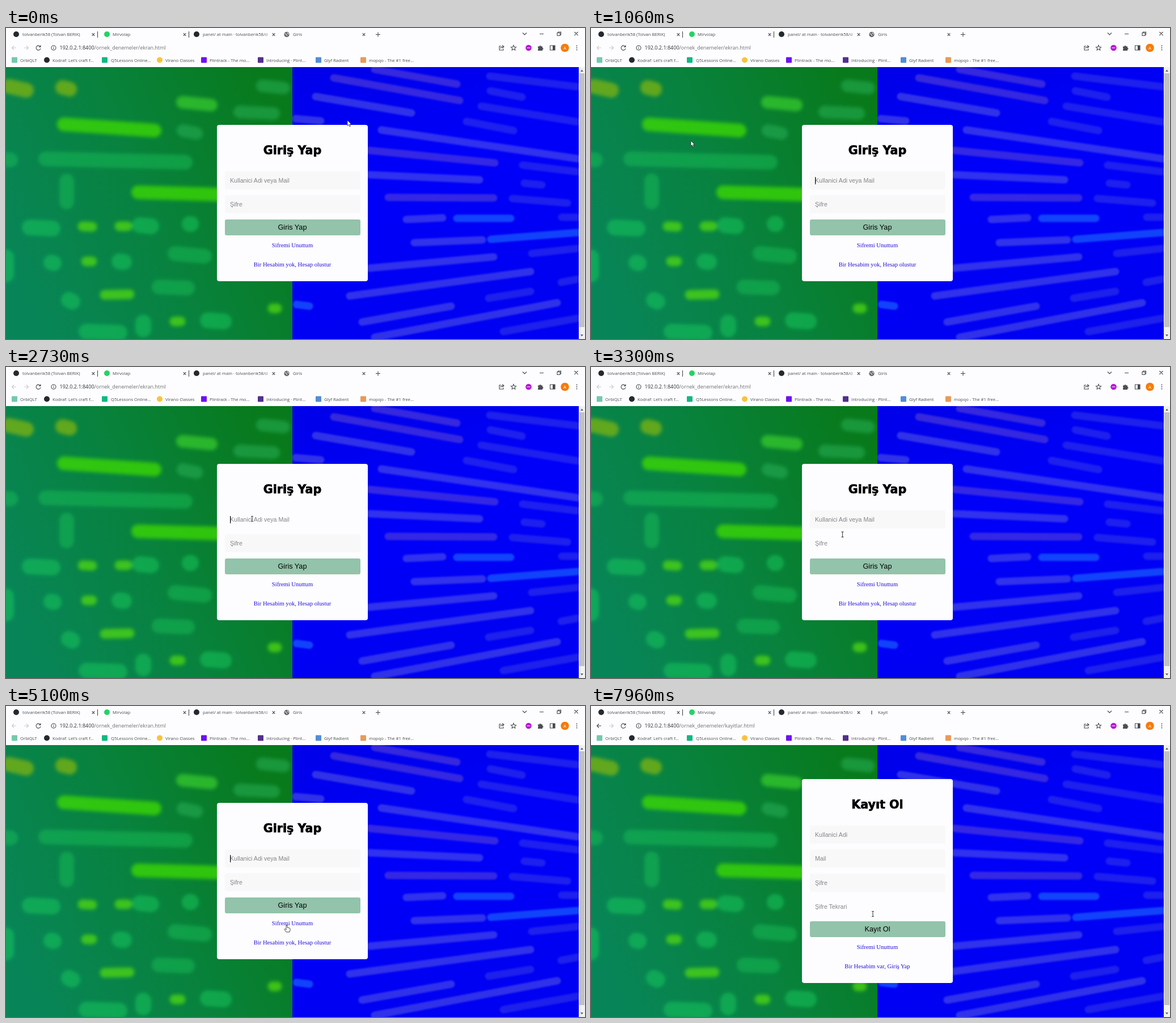
These frames come from a looping animation (1021 px wide and 549 px high, 8000 ms). An HTML page:

```html
<!DOCTYPE html>
<html lang="tr">
<head>
<meta charset="utf-8">
<title>Giris</title>
<style>
  html, body { margin: 0; width: 100%; height: 100%; overflow: hidden; background: #fdfdff; }
  svg { display: block; }
  .ui { font: 7.7px "Open Sans", sans-serif; fill: #4a4d51; }
  .url { font-size: 9px; fill: #6b6e72; }
  .line { fill: none; stroke: #45484c; stroke-width: 1.1; }
  .word { fill: none; stroke-linecap: round; }
  .title { font: bold 20.6px "DejaVu Sans", sans-serif; text-anchor: middle; stroke: #000; stroke-width: .7; }
  .hint { font: 10.6px "Liberation Sans", Arial, sans-serif; fill: #85858a; }
  .label { font: 12.7px "Liberation Sans", Arial, sans-serif; text-anchor: middle; }
  .link { font: 10.64px "Liberation Serif", Times, serif; fill: #2310d8; text-anchor: middle; }
</style>
</head>
<body>
<svg id="stage" width="1021" height="549" viewBox="0 0 1021 549">
  <defs>
    <linearGradient id="green" x1="0" y1=".7" x2="1" y2=".3">
      <stop offset="0" stop-color="#088558"/><stop offset=".5" stop-color="#08823d"/><stop offset="1" stop-color="#087a1c"/>
    </linearGradient>
    <linearGradient id="blue" x1="0" y1="0" x2=".3" y2="1">
      <stop offset="0" stop-color="#0000e8"/><stop offset=".45" stop-color="#0000fa"/><stop offset="1" stop-color="#0000f2"/>
    </linearGradient>
    <linearGradient id="fade"><stop offset="0" stop-color="#fdfdff" stop-opacity="0"/><stop offset="1" stop-color="#fdfdff"/></linearGradient>
    <filter id="soft"><feGaussianBlur stdDeviation="3"/></filter>
    <filter id="slight"><feGaussianBlur stdDeviation="1.8"/></filter>
    <clipPath id="leftHalf"><path d="M0 69H505V549H0z"/></clipPath>
    <clipPath id="rightHalf"><path d="M505 69H1010V549H505z"/></clipPath>
  </defs>

  <path fill="url(#green)" d="M0 69H505V549H0z"/>
  <g clip-path="url(#leftHalf)"><g class="word" filter="url(#soft)">
    <g opacity=".75">
      <path stroke="#7fb414" stroke-width="26" d="M5 103L36 110M100 105L112 108"/>
      <path stroke="#3ddc08" stroke-width="24" d="M102 170L262 181M233 290L375 294"/>
      <path stroke="#34c82c" stroke-width="22" d="M311 131L362 136"/>
      <path stroke="#50d80c" stroke-width="17" d="M135 350L152 351M141 412L152 412M174 471L218 470M297 518L308 518M470 495L478 495M200 350L214 350"/>
    </g>
    <g opacity=".5">
      <path stroke="#2fb35a" stroke-width="22" d="M452 102L490 106M412 148L472 151M312 181L336 186"/>
      <path stroke="#1dbd58" stroke-width="26" d="M0 232L8 233M70 231L316 237M107 270V307M298 398L350 403M270 457L320 459"/>
      <path stroke="#18cc5c" stroke-width="28" d="M42 352L82 354M236 348L256 350M80 414L84 415M200 412L208 413M0 405V435M111 480L117 483M356 516L384 518M242 520V532M142 536L200 538M324 346L326 346"/>
    </g>
  </g></g>

  <path fill="url(#blue)" d="M505 69H1010V549H505z"/>
  <g clip-path="url(#rightHalf)"><g class="word" filter="url(#slight)" stroke-width="13">
    <path stroke="#6a50d0" opacity=".5" d="M578 88L800 128M650 73L795 99M640 216L862 238M674 299L860 300"/>
    <path stroke="#6a70e0" opacity=".45" d="M546 121L715 150M510 160L555 164M662 180L1010 231M640 259L835 268M706 338L770 335M720 379L840 374M640 424L860 404M606 473L925 430M628 519L785 491M650 546L972 485"/>
    <path stroke="#4c52e0" opacity=".4" d="M853 85L1010 104M854 111L910 122M838 138L1010 166M812 165L895 181M911 242L1010 254M914 274L945 277M893 301L990 309M980 334H1010M927 398L1010 389M851 477L925 465M979 449L1010 443M877 536L1010 512"/>
    <path stroke="#207cff" opacity=".55" d="M795 336L890 336M855 373L1010 361M512 488L535 491"/>
  </g></g>

  <path fill="#f1f1f3" d="M1010 69H1021V549H1010z"/>
  <path fill="#c1c1c4" d="M1011 80H1020V528H1011z"/>
  <path fill="#606266" d="M1013 77L1015.500 73.500L1018 77zM1013 541L1015.500 544.500L1018 541z"/>

  <g id="chrome" class="ui"></g>
  <g id="login"></g>
  <g id="register"></g>
  <path id="caret" d="M395.700 263V276" stroke="#111" stroke-width="1.200"/>

  <g id="arrow"><path d="M0 0V9.500L2.200 7.500L3.800 11L5.500 10.200L3.900 6.900H7z" fill="#fff" stroke="#222" stroke-width=".8"/></g>
  <g id="beam" class="line"><path d="M-2 -4.500H2M0 -4.500V4.500M-2 4.500H2"/></g>
  <g id="hand"><path d="M-1 0Q0 -1 1 0V4L5 5Q6 5 6 6.500V9L5 12H-1L-4 7.500Q-4 6 -2.500 6.500L-1 8z" fill="#fff" stroke="#222" stroke-width=".8"/></g>
</svg>
<script>
const $ = id => document.getElementById(id);
const show = (id, on) => $(id).setAttribute('display', on ? 'inline' : 'none');
const text = (x, y, str, cls = '', id = '') => `<text x="${x}" y="${y}" class="${cls}" id="${id}">${str}</text>`;
const rect = (x, y, w, h, fill, r = 0, id = '') =>
  `<rect x="${x}" y="${y}" width="${w}" height="${h}" rx="${r}" fill="${fill}" id="${id}"/>`;
const dot = (x, y, r, fill) => `<circle cx="${x}" cy="${y}" r="${r}" fill="${fill}"/>`;
const line = (d, id = '') => `<path class="line" d="${d}" id="${id}"/>`;
const cross = (x, y, r) => `M${x - r} ${y - r}l${2 * r} ${2 * r}m0 ${-2 * r}l${-2 * r} ${2 * r}`;

const HOST = '192.0.2.1:8400', FOLDER = '/ornek_denemeler/';
const bookmarks = [
  [15, 25, 'OrbiQLT', '#74c9ab', 0], [72, 82, 'Kodraf: Let’s craft f...', '#24292e', 1],
  [174, 185, 'Q5Lessons Online...', '#10b981', 0], [271, 281, 'Virano Classes', '#f8c33c', 1],
  [349, 359, 'Plintrack - The mo...', '#6f10f2', 0], [449, 459, 'Introducing · Plint...', '#52308c', 0],
  [551, 561, 'Glyf Radient', '#528dd7', 0], [630, 640, 'mopqo - The #1 free...', '#e89a58', 0]
];

$('chrome').innerHTML = [
  dot(18, 11, 5, '#24292e'), text(29, 14, 'tolvanberik58 (Tolvan BERIK)'),
  dot(178, 11, 5, '#25d366'), text(188, 14, 'Mirvolap'),
  dot(336, 11, 5, '#24292e'), text(347, 14, 'panel/ at main · tolvanberik58/d'),
  text(506, 14, '', '', 'tabTitle'),
  ...[132, 455, 610].map(x => rect(x, 3, 14, 16, 'url(#fade)')),
  rect(146, 3, 6, 16, '#fdfdff'), rect(469, 3, 12, 16, '#fdfdff'), rect(624, 3, 10, 16, '#fdfdff'),
  line([154, 315, 472, 631].map(x => cross(x, 11.5, 2.3)).join('')),
  line('M161.500 6V17M322.500 6V17M652 11.500H660M656 7.500V15.500'),
  `<g id="globe">${dot(495, 11.5, 4.7, '#686b70')}<path d="M491.500 10l3 1l1 3M496 8l1 2l2 1" stroke="#fff" fill="none"/></g>`,
  `<g id="pageIcon">${rect(494, 8, 2, 7, '#85888d', 1)}</g>`,
  line('M911 8.500l3.500 3.500l3.500 -3.500M941 10.500H948M972 8.500h5v5h-5zM973.500 8.500V7h5v5H977' + cross(1005.500, 10, 3)),
  line('M18 35H10.500M14 31.500L10.500 35L14 38.500', 'back'),
  `<path class="line" style="stroke:#c9cace" d="M32 35h7.500M36 31.500l3.500 3.500l-3.500 3.500"/>`,
  line('M60.500 33A4 4 0 1 0 61 36M61 30.500V33.500H58', 'reload'),
  line(cross(57, 35, 3.2), 'stop'),
  `<circle class="line" cx="84" cy="35" r="4"/>`, line('M84 34.500V37M84 32.500V33.500'),
  `<text x="94.500" y="38" class="url"><tspan fill="#303236">${HOST}</tspan><tspan id="path"></tspan></text>`,
  line('M873 32H870V39H877V36.500M872 36Q872.500 33 877 33M875 30.500L878 33L875 35.500'),
  line('M895 30.500l1.300 3l3.200 .3l-2.400 2.100l.7 3.200l-2.800 -1.700l-2.800 1.700l.7 -3.200l-2.400 -2.100l3.200 -.3z'),
  dot(921.500, 35, 5.3, '#b518d4'), rect(918.500, 34.500, 6, 1, '#fff'),
  `<path fill="#4b4e52" d="M938 32.500h2.500a1.500 1.500 0 0 1 3 0h2.500v2.500a1.500 1.500 0 0 1 0 3v2h-8v-2.500a1.500 1.500 0 0 0 0 -2.500z"/>`,
  line('M959.500 31h8.500v8h-8.500z'), rect(964, 31, 4, 8, '#45484c'),
  dot(985.500, 35, 7.3, '#f57c0a'), `<text x="985.500" y="38" text-anchor="middle" fill="#fff">A</text>`,
  ...[31.5, 35, 38.5].map(y => dot(1006.500, y, .9, '#45484c')),
  ...bookmarks.map(([x, tx, name, color, round]) =>
    rect(x - 5, 51.500, 10, 10, color, round ? 5 : 1) + text(tx, 59.500, name))
].join('');

const pages = {
  login: { top: 171, h: 276, title: 'Giriş Yap', button: 'Giris Yap', fields: ['Kullanici Adi veya Mail', 'Şifre'],
    other: 'Bir Hesabim yok, Hesap olustur', url: 'ekran.html', tab: 'Giris' },
  register: { top: 129, h: 360, title: 'Kayıt Ol', button: 'Kayıt Ol', fields: ['Kullanici Adi', 'Mail', 'Şifre', 'Şifre Tekrari'],
    other: 'Bir Hesabim var, Giriş Yap', url: 'kayitlar.html', tab: 'Kayit' }
};
const fieldY = (page, i) => Math.round(page.top + 82 + i * 42.3);

for (const [id, page] of Object.entries(pages)) {
  const buttonY = fieldY(page, page.fields.length);
  page.links = [buttonY + 45, buttonY + 78.500];
  $(id).innerHTML = rect(372, page.top, 266, page.h, '#fdfdff', 4)
    + text(505, page.top + 52, page.title, 'title')
    + page.fields.map((name, i) => rect(386, fieldY(page, i), 239, 32, '#f8f8f8', 4, id + i)
      + text(395, fieldY(page, i) + 20, name, 'hint')).join('')
    + rect(386, buttonY, 239, 28, '#93c3aa', 3)
    + text(505, buttonY + 18.300, page.button, 'label')
    + text(505, page.links[0] + 4, 'Sifremi Unuttum', 'link')
    + text(505, page.links[1] + 4, page.other, 'link');
}

// time, x, y of the pointer
const route = [
  [0, 602, 163], [30, 602, 163], [1000, 176, 199], [1250, 176, 199], [2650, 434, 268], [2850, 434, 268],
  [3900, 458, 338], [4460, 458, 338], [5000, 495, 387], [5330, 495, 387], [6000, 497, 417],
  [7400, 497, 417], [7900, 497, 367], [8000, 497, 367]
];
const ease = k => k * k * (3 - 2 * k);

function pointer(t) {
  const i = route.findIndex(p => p[0] > t);
  const [t0, x0, y0] = route[i - 1], [t1, x1, y1] = route[i];
  const k = ease((t - t0) / (t1 - t0));
  return [x0 + (x1 - x0) * k, y0 + (y1 - y0) * k];
}

const OPEN = 6300, LOADED = 6700;
const caretOn = t => t < OPEN ? t >= 550 && (t - 550) % 1060 < 530 : t < 6900 || (t >= 7430 && t < 7950);

function draw(t) {
  const id = t < OPEN ? 'login' : 'register', page = pages[id];
  const loading = t >= OPEN && t < LOADED;
  show('login', id === 'login');
  show('register', id === 'register');
  show('globe', t < OPEN);
  show('pageIcon', t >= LOADED);
  show('reload', !loading);
  show('stop', loading);
  $('back').style.stroke = t < OPEN ? '#c9cace' : '#45484c';
  $('path').textContent = FOLDER + page.url;
  $('tabTitle').textContent = loading ? HOST + FOLDER + page.url : page.tab;

  show('caret', caretOn(t));
  $('caret').setAttribute('transform', `translate(0 ${page.top - 171})`);

  const [x, y] = pointer(t);
  const inField = i => x > 386 && x < 625 && y > fieldY(page, i) && y < fieldY(page, i) + 32;
  let kind = 'arrow';
  page.fields.forEach((_, i) => {
    $(id + i).setAttribute('fill', inField(i) ? '#fdfdff' : '#f8f8f8');
    if (inField(i)) kind = 'beam';
  });
  if (page.links.some(ly => Math.abs(y - ly) < 6.5) && Math.abs(x - 505) < 37) kind = 'hand';
  for (const name of ['arrow', 'beam', 'hand']) {
    show(name, name === kind);
    $(name).setAttribute('transform', `translate(${x.toFixed(1)} ${y.toFixed(1)})`);
  }
}

const start = performance.now();
(function tick() {
  draw((performance.now() - start) % 8000);
  requestAnimationFrame(tick);
})();
</script>
</body>
</html>
```
